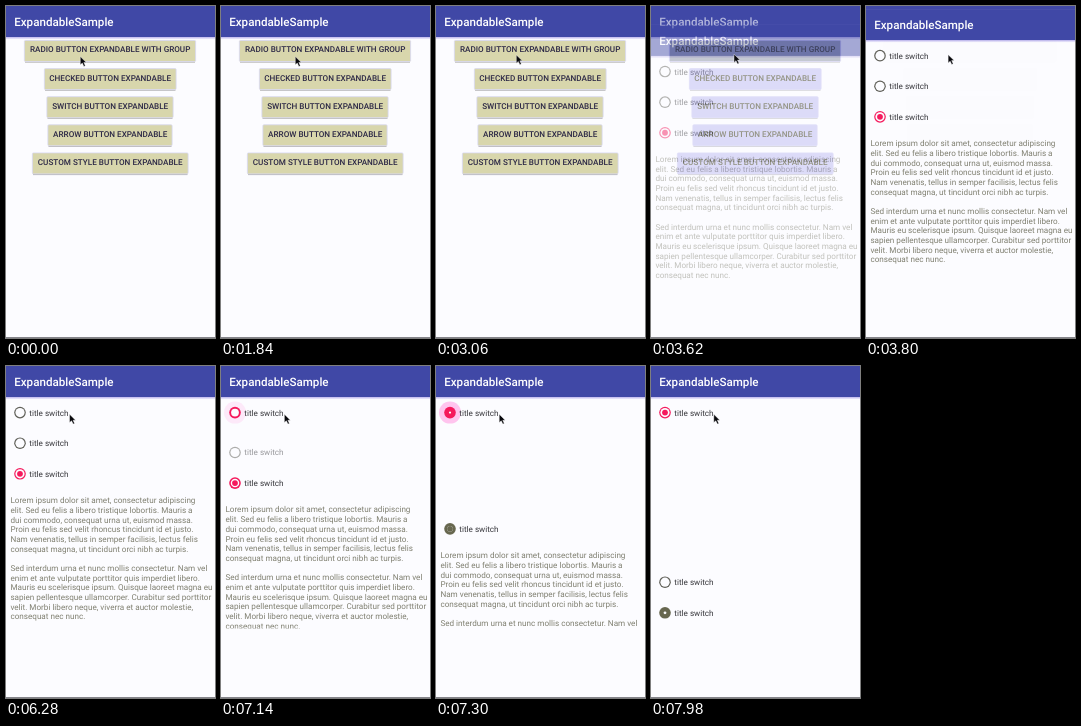
Recreate the animation shown at these times as an HTML page. Size 209 by 332 pixels, loop 8 s.

```html
<!DOCTYPE html>
<html lang="en">
<head>
<meta charset="utf-8">
<title>ExpandableSample</title>
<style>
html, body { margin: 0; width: 100%; height: 100%; overflow: hidden; background: #fcfcff; }
svg { display: block; width: 209px; height: 332px; text-rendering: geometricPrecision; }
text { font: 400 8.13px Roboto, sans-serif; white-space: pre; }
.title { font-size: 11.61px; font-weight: 500; fill: #fff; }
.btn { font-weight: 500; fill: #2b2745; text-anchor: middle; }
.label { fill: #35353a; }
.para { fill: #7f7f70; }
.leaving .btn { fill: #3a3a1c; }
.leaving .face { fill: #c2c0f2; stroke: #c8c6f4; }
.leaving .pressed { fill: #959bab; }
.leaving .title { opacity: .6; }
</style>
</head>
<body>
<svg id="stage" viewBox="0 0 209 332">
  <defs>
    <linearGradient id="shade" x1="0" y1="0" x2="0" y2="1">
      <stop offset="0" stop-color="#bdb5ee"/>
      <stop offset="1" stop-color="#fcfcff"/>
    </linearGradient>
    <clipPath id="fold"><rect y="0" width="209" height="262.5"/></clipPath>
  </defs>
  <g id="menu"></g>
  <g id="page"></g>
  <rect y="331" width="209" height="1" fill="#84848a"/>
  <path id="cursor" d="M0 0V8.2L2 6.5L3.6 9.8L5 9.1L3.5 5.9H6Z" fill="#08080c" stroke="#fff" stroke-width=".4"/>
</svg>
<script>
const LOOP = 8000;
const $ = id => document.getElementById(id);
const menu = $('menu'), page = $('page'), cursor = $('cursor');

function add(parent, tag, attrs = {}, text) {
  const el = document.createElementNS('http://www.w3.org/2000/svg', tag);
  for (const k in attrs) el.setAttribute(k, attrs[k]);
  if (text) el.textContent = text;
  return parent.appendChild(el);
}

function screen(parent) {
  add(parent, 'rect', { width: 209, height: 332, fill: '#fcfcff' });
  add(parent, 'rect', { y: 31, width: 209, height: 2.6, fill: 'url(#shade)' });
  add(parent, 'rect', { width: 209, height: 31, fill: '#4048a6' });
  add(parent, 'text', { x: 8.2, y: 19.6, class: 'title' }, 'ExpandableSample');
}

// First screen
screen(menu);
[
  ['RADIO BUTTON EXPANDABLE WITH GROUP', 18, 190],
  ['CHECKED BUTTON EXPANDABLE', 38, 170.5],
  ['SWITCH BUTTON EXPANDABLE', 40.5, 167.5],
  ['ARROW BUTTON EXPANDABLE', 41.5, 166.5],
  ['CUSTOM STYLE BUTTON EXPANDABLE', 26, 182.5]
].forEach(([name, left, right], i) => {
  const y = 34.5 + 28.1 * i;
  add(menu, 'rect', { x: left + 1, y: y + 21, width: right - left - 2, height: 1.2, fill: '#b9b8b8' });
  add(menu, 'rect', {
    x: left + .4, y, width: right - left - .8, height: 21, rx: 1,
    fill: '#d8d6ac', stroke: '#d9d8f2', 'stroke-width': .8, class: i ? 'face' : 'face pressed'
  });
  add(menu, 'text', { x: 104.2, y: y + 11.9, class: 'btn' }, name);
});

// Second screen
screen(page);
const rows = [46.6, 77.2, 107.8].map(y => {
  const g = add(page, 'g');
  const halo = add(g, 'circle', { cx: 14, cy: y, r: 11, fill: '#ffc4ee', opacity: 0 });
  const [disc, hole, dot] = [5.8, 4.6, 0].map(r => add(g, 'circle', { cx: 14, cy: y, r, fill: '#fcfcff' }));
  add(g, 'text', { x: 23.3, y: y + 3, class: 'label' }, 'title switch');
  return { g, halo, disc, hole, dot };
});
const fold = add(page, 'g', { 'clip-path': 'url(#fold)' });
const body = add(fold, 'g');
[
  'Lorem ipsum dolor sit amet, consectetur adipiscing',
  'elit. Sed eu felis a libero tristique lobortis. Mauris a',
  'dui commodo, consequat urna ut, euismod massa.',
  'Proin eu felis sed velit rhoncus tincidunt id et justo.',
  'Nam venenatis, tellus in semper facilisis, lectus felis',
  'consequat magna, ut tincidunt orci nibh ac turpis.',
  '',
  'Sed interdum urna et nunc mollis consectetur. Nam vel',
  'enim et ante vulputate porttitor quis imperdiet libero.',
  'Mauris eu scelerisque ipsum. Quisque laoreet magna eu',
  'sapien pellentesque ullamcorper. Curabitur sed porttitor',
  'velit. Morbi libero neque, viverra et auctor molestie,',
  'consequat nec nunc.'
].forEach((line, i) => add(body, 'text', { x: 4.4, y: 137.2 + 9.67 * i, class: 'para' }, line));

const clamp = v => Math.min(1, Math.max(0, v));
const ease = v => (1 - Math.cos(Math.PI * clamp(v))) / 2;

// Linear interpolation through [step, value, value...] rows
function track(table, n) {
  let i = table.findIndex(r => r[0] > n);
  if (i < 0) return table[table.length - 1].slice(1);
  if (i === 0) return table[0].slice(1);
  const a = table[i - 1], b = table[i], k = (n - a[0]) / (b[0] - a[0]);
  return a.slice(1).map((v, j) => v + (b[j + 1] - v) * k);
}

const POINTER = [[57, 74.3, 50.6], [70, 83, 48.2], [78, 83, 48.2], [84, 82, 48.8], [112, 82, 48.8],
  [120, 75, 49], [131, 63.6, 48.3], [153, 63.4, 48.3], [172, 62.8, 48.3]];
// step, hole radius, dot radius
const TURN_ON = [[153, 4.6, 0], [158, 1.1, 0], [160, 0, 0], [161, 2.9, 2.9], [169, 4.6, 2.9]];
const TURN_OFF = [[153, 4.6, 2.9], [158, 2.9, 2.9], [159, 0, 0], [169, 0, 0], [172, 1.4, 0]];
const HALO = [[153, 0], [156, 1], [160, 1], [170, 0]];
const SECOND = [[153, 1], [155, 0], [162, 0], [168, 1]];
const PINK = '#f5195c', GREY = '#5f5f58', OLIVE = '#67674f';

function radio(row, color, hole, dot) {
  row.disc.setAttribute('fill', color);
  row.dot.setAttribute('fill', color);
  row.hole.setAttribute('r', hole);
  row.dot.setAttribute('r', dot);
}

const shift = (el, y) => el.setAttribute('transform', `translate(0 ${y})`);

// The clip advances in a 20, 20, 100 ms rhythm
function stepAt(t) {
  const u = t + 20, p = u % 140;
  return 3 * Math.floor(u / 140) + (p < 20 ? 0 : p < 40 ? 1 : 2);
}

function draw(t) {
  const n = stepAt(t);

  const age = (n - 76.85) * 20;
  page.setAttribute('opacity', 1 - (1 - clamp(age / 160)) ** 4);
  shift(page, 26.6 * (1 - clamp(age / 350)) ** 5);
  menu.setAttribute('class', age > 0 ? 'leaving' : '');

  const open = 139 * ease((n - 151.5) / 15);
  const drop = n < 153 ? 0 : open;
  shift(rows[1].g, drop);
  shift(rows[2].g, drop);
  shift(body, drop);
  body.setAttribute('opacity', drop > 138 ? 0 : 1);
  rows[1].g.setAttribute('opacity', track(SECOND, n)[0]);
  rows[0].halo.setAttribute('opacity', track(HALO, n)[0]);

  radio(rows[0], n > 153 ? PINK : GREY, ...track(TURN_ON, n));
  radio(rows[1], GREY, 4.6, 0);
  radio(rows[2], n > 154 ? OLIVE : PINK, ...track(TURN_OFF, n));

  cursor.setAttribute('transform', `translate(${track(POINTER, n).join(' ')})`);
}

const start = performance.now();
function tick() {
  draw((performance.now() - start) % LOOP);
  requestAnimationFrame(tick);
}
tick();
</script>
</body>
</html>
```
